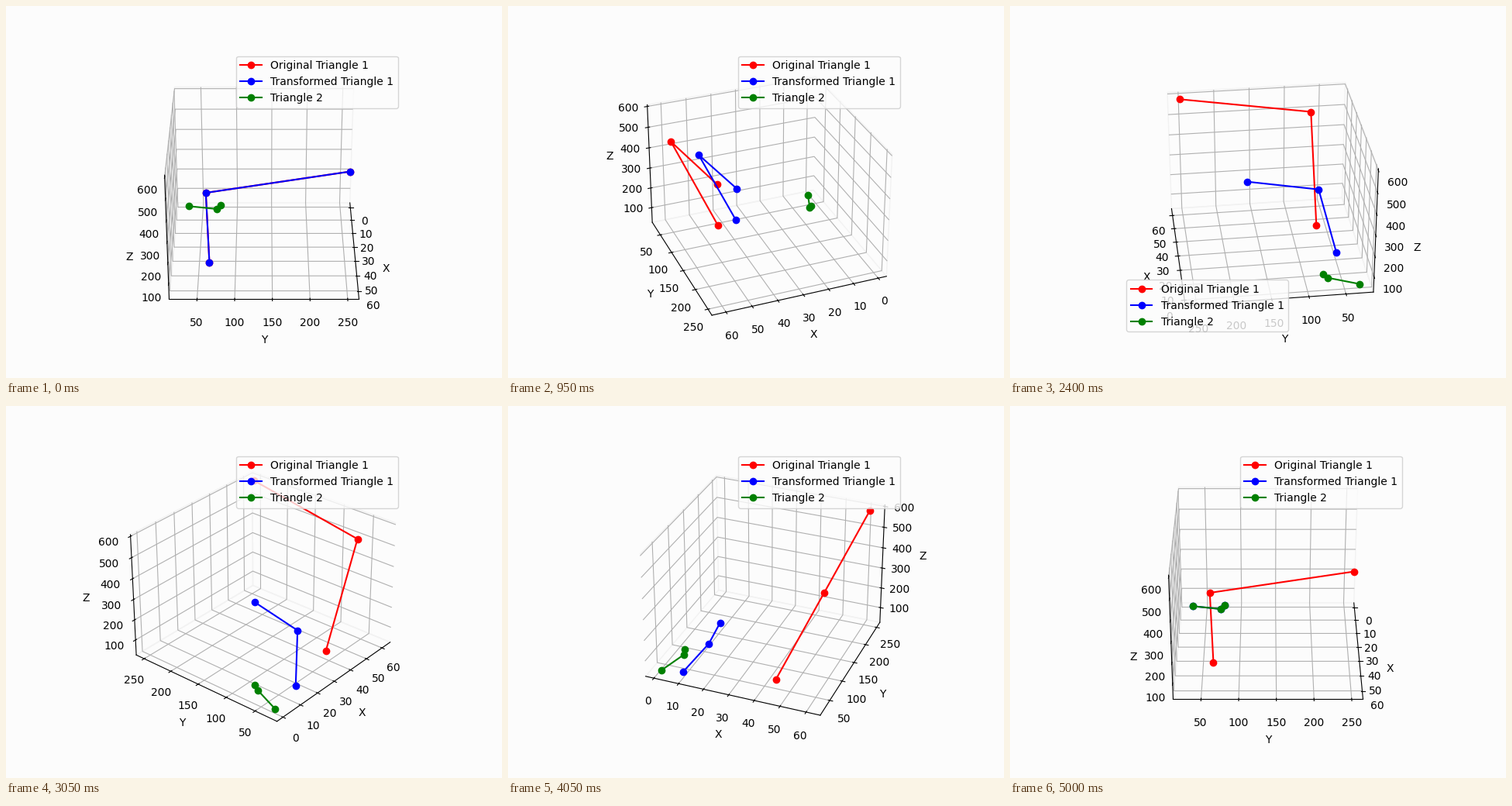
Animation of 640 by 480 pixels, one loop 5050 ms. Source, as a matplotlib script:

```python
import numpy as np
import matplotlib.pyplot as plt
from matplotlib.animation import FuncAnimation

FRAMES = 101
BG = "#fcfcfc"

start = np.array([[61, 249, 596], [61, 64, 499], [43, 64, 40]], float)
end = np.array([[5, 76, 67], [5, 70.5, 48], [1, 29, 36]], float)

fig = plt.figure(figsize=(6.4, 4.8), dpi=100, facecolor=BG)
ax = fig.add_subplot(projection="3d", facecolor=BG)


def add_path(points, color, label):
    return ax.plot(*points.T, "o-", color=color, label=label)[0]


def padded(lo, hi, margin):
    """Widen a data range by the axis margin and the view margin."""
    mid = (lo + hi) / 2
    half = (hi - lo) / 2 * (1 + 2 * margin) * 25 / 24
    return mid - half, mid + half


add_path(start, "red", "Original Triangle 1")
moving = add_path(start, "blue", "Transformed Triangle 1")
add_path(end, "green", "Triangle 2")

low, high = end.min(axis=0), start.max(axis=0)
ax.set_xlim(*padded(low[0], high[0], 0.05))
ax.set_ylim(*padded(low[1], high[1], 0.05))
ax.set_zlim(*padded(low[2], high[2], 0))
ax.set_xlabel("X")
ax.set_ylabel("Y")
ax.set_zlabel("Z")

# Panes show only as faint outlines
for axis in (ax.xaxis, ax.yaxis, ax.zaxis):
    axis.pane.set_fill(False)
    axis.pane.set_alpha(1)
    axis.pane.set_edgecolor("#f2f2f2")

ax.legend(loc="best", facecolor=BG)


def update(frame):
    t = frame / (FRAMES - 1)
    points = (1 - t) * start + t * end
    moving.set_data_3d(*points.T)
    ax.view_init(elev=30, azim=360 * t)
    return (moving,)


anim = FuncAnimation(fig, update, frames=FRAMES, interval=50,
                     repeat=True, repeat_delay=0, blit=False)
plt.show()
```
